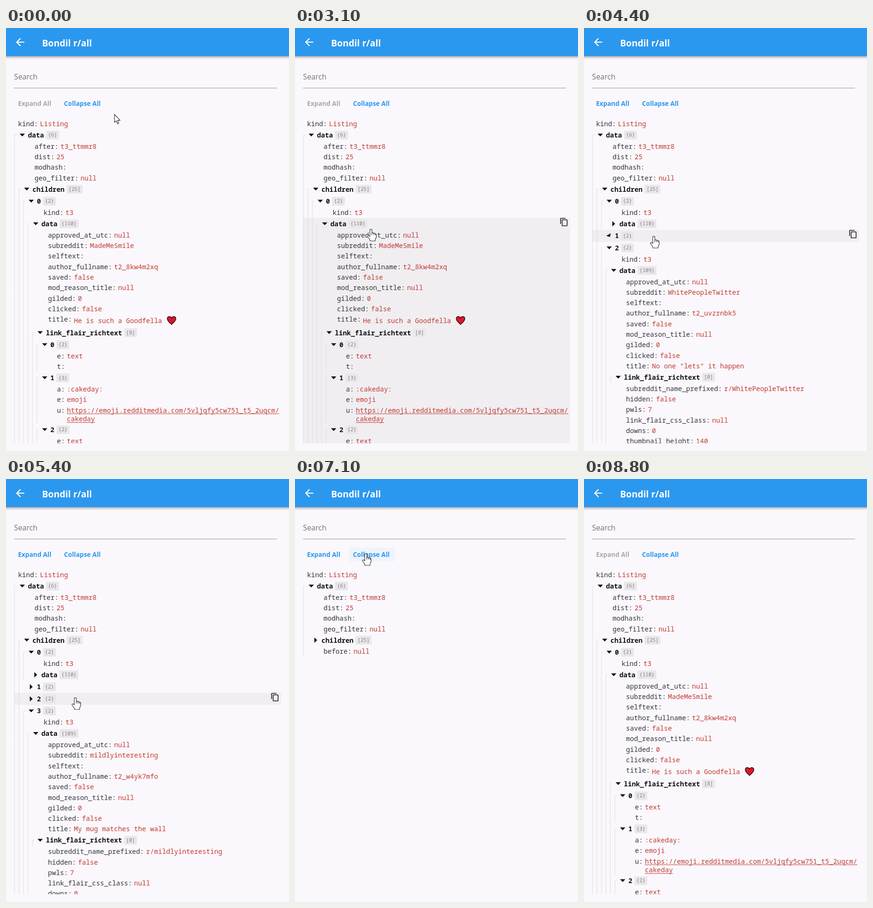
An HTML page with a canvas that plays this animation: 600x896 px, repeating every 9.5 s.

```html
<!DOCTYPE html>
<html lang="en">
<head>
<meta charset="utf-8">
<title>JSON explorer</title>
<style>
html, body { margin: 0; width: 100%; height: 100%; overflow: hidden; background: #faf8fc; }
canvas { display: block; }
</style>
</head>
<body>
<canvas id="stage" width="600" height="896"></canvas>
<script>
const ctx = document.getElementById('stage').getContext('2d');
const LOOP = 9500, STEP = 100, SPIN = 300;
const COLLAPSE_ALL = 7200, EXPAND_ALL = 8200;
const TOP = 192, BOTTOM = 879.5, LEAF_H = 22.3, NODE_H = 25.5;
const INDENT = 9.5, CHAR = 8.5;
const MONO = '"Noto Sans Mono", "DejaVu Sans Mono", monospace';
const SANS = '"Open Sans", "Noto Sans", sans-serif';
const BLUE = '#2b98ef', RED = '#c23a34';

const leaf = (key, value = '', extra = {}) => ({ key, value, h: LEAF_H, ...extra });
const node = (key, badge, kids, closeAt = Infinity) => ({ key, badge, kids, closeAt, h: NODE_H });

function post(index, sub, author, title, options = {}) {
  const { size = 109, closeAt, dataCloseAt, flair = [], heart = false } = options;
  const data = node('data', `{${size}}`, [
    leaf('approved_at_utc', 'null'),
    leaf('subreddit', sub),
    leaf('selftext'),
    leaf('author_fullname', author),
    leaf('saved', 'false'),
    leaf('mod_reason_title', 'null'),
    leaf('gilded', '0'),
    leaf('clicked', 'false'),
    leaf('title', title, heart ? { heart, h: 26.8 } : {}),
    node('link_flair_richtext', flair.length ? '[8]' : '[0]', flair),
    leaf('subreddit_name_prefixed', 'r/' + sub),
    leaf('hidden', 'false'),
    leaf('pwls', '7'),
    leaf('link_flair_css_class', 'null'),
    leaf('downs', '0'),
    leaf('thumbnail_height', '140'),
    leaf('top_awarded_type', 'null'),
    leaf('hide_score', 'false')
  ], dataCloseAt);
  return node(String(index), '{2}', [leaf('kind', 't3'), data], closeAt);
}

const flair = [
  node('0', '{2}', [leaf('e', 'text'), leaf('t')]),
  node('1', '{3}', [
    leaf('a', ':cakeday:'),
    leaf('e', 'emoji'),
    leaf('u', 'https://emoji.redditmedia.com/5vljqfy5cw751_t5_2uqcm/', { wrap: 'cakeday', h: 39.8 })
  ]),
  node('2', '{2}', [leaf('e', 'text'), leaf('t')])
];

const tree = [
  leaf('kind', 'Listing'),
  node('data', '{6}', [
    leaf('after', 't3_ttmmr8'),
    leaf('dist', '25'),
    leaf('modhash'),
    leaf('geo_filter', 'null'),
    node('children', '[25]', [
      post(0, 'MadeMeSmile', 't2_8kw4m2xq', 'He is such a Goodfella',
        { size: 110, dataCloseAt: 3400, flair, heart: true }),
      post(1, 'gardening', 't2_v6nq3zth', 'First tomatoes of the year', { closeAt: 4300 }),
      post(2, 'WhitePeopleTwitter', 't2_uvzrnbk5', 'No one "lets" it happen', { closeAt: 5100 }),
      post(3, 'mildlyinteresting', 't2_w4yk7mfo', 'My mug matches the wall'),
      post(4, 'pics', 't2_z9bt2lqa', 'Morning by the lake')
    ], 6400),
    leaf('before', 'null')
  ])
];

// Time and tip position of the pointer
const path = [
  [500, 230, 183], [600, 228, 186], [900, 228, 186], [1700, 204, 231],
  [2000, 204, 231], [3000, 162, 424], [3100, 161, 426], [3400, 161, 426],
  [4100, 148, 441], [4400, 148, 441], [4800, 147, 463], [5500, 147, 463],
  [6100, 135, 349], [6400, 135, 349], [7000, 150, 158], [7300, 150, 158],
  [7700, 78, 158], [8300, 78, 158], [8800, -40, 150]
];

const clamp = v => Math.max(0, Math.min(1, v));

function pointerAt(t) {
  const i = path.findIndex(p => p[0] >= t);
  if (i <= 0) return path[i < 0 ? path.length - 1 : 0].slice(1);
  const [t0, x0, y0] = path[i - 1], [t1, x1, y1] = path[i];
  const u = (t - t0) / (t1 - t0), e = u * u * (3 - 2 * u);
  return [x0 + (x1 - x0) * e, y0 + (y1 - y0) * e];
}

function openness(item, t) {
  if (t >= EXPAND_ALL) return clamp((t - EXPAND_ALL) / SPIN);
  return 1 - clamp((t - Math.min(item.closeAt, COLLAPSE_ALL)) / SPIN);
}

const isOpen = (item, t) => t >= EXPAND_ALL || t < Math.min(item.closeAt, COLLAPSE_ALL);

function layout(t) {
  const rows = [];
  let y = TOP;
  const visit = (items, depth) => {
    for (const item of items) {
      const row = { item, depth, y, cy: y + (item.kids ? NODE_H : LEAF_H) / 2 };
      rows.push(row);
      y += item.h;
      if (item.kids && isOpen(item, t)) visit(item.kids, depth + 1);
      row.end = y;
    }
  };
  visit(tree, 0);
  return rows;
}

function text(str, x, y, font, color) {
  ctx.font = font;
  ctx.fillStyle = color;
  ctx.fillText(str, x, y);
}

function roundRect(x, y, w, h, r, color) {
  ctx.fillStyle = color;
  ctx.beginPath();
  ctx.roundRect(x, y, w, h, r);
  ctx.fill();
}

function icon(d, x, y, scale, cx, cy, color) {
  ctx.save();
  ctx.translate(x, y);
  ctx.scale(scale, scale);
  ctx.translate(-cx, -cy);
  ctx.fillStyle = color;
  ctx.fill(new Path2D(d));
  ctx.restore();
}

function drawHeart(x, y) {
  const heart = new Path2D('M0 8.5C-4 5-9 1-9-3.5C-9-9-2.5-10 0-5C2.5-10 9-9 9-3.5C9 1 4 5 0 8.5Z');
  ctx.save();
  ctx.translate(x, y);
  ctx.fillStyle = '#e3142b';
  ctx.fill(heart);
  ctx.strokeStyle = '#2c1015';
  ctx.lineWidth = 1.6;
  ctx.stroke(heart);
  ctx.restore();
}

function drawNode({ item, depth, cy, end }, t) {
  const shift = depth * INDENT, x = 46.5 + shift;
  if (isOpen(item, t)) {
    const lineX = 18 + shift;
    ctx.strokeStyle = '#dedce1';
    ctx.lineWidth = 1;
    ctx.beginPath();
    ctx.moveTo(lineX + 4, cy - 0.5);
    ctx.lineTo(lineX, cy - 0.5);
    ctx.lineTo(lineX, end - 1);
    ctx.stroke();
  }
  ctx.save();
  ctx.translate(34.5 + shift, cy - 0.4);
  ctx.rotate(openness(item, t) * Math.PI / 2);
  ctx.fillStyle = '#111';
  ctx.beginPath();
  ctx.moveTo(-3, -5.6);
  ctx.lineTo(3, 0);
  ctx.lineTo(-3, 5.6);
  ctx.fill();
  ctx.restore();

  text(item.key, x, cy + 4.8, `bold 14.17px ${MONO}`, '#111113');
  const badgeX = x + item.key.length * CHAR + 4.5;
  roundRect(badgeX, cy - 9.5, item.badge.length * 6.4 + 8, 18.5, 2, '#e9e7ea');
  text(item.badge, badgeX + 4, cy + 3.2, `10.67px ${MONO}`, '#828184');
}

function drawLeaf({ item, depth, y, cy }) {
  const font = `14.17px ${MONO}`;
  const x = depth ? 51 + depth * INDENT : 25.5;
  const valueX = x + (item.key.length + 1) * CHAR + 4;
  const keyY = item.heart ? y + 16 : cy + 4.8;
  const valueY = item.heart ? y + 19 : keyY;
  text(item.key + ':', x, keyY, font, '#353438');
  text(item.value, valueX, valueY, font, RED);
  if (item.heart) drawHeart(valueX + item.value.length * CHAR + 20, y + 13.3);
  if (item.wrap) {
    text(item.wrap, valueX, valueY + 18.5, font, RED);
    ctx.fillRect(valueX, valueY + 2, item.value.length * CHAR, 1);
    ctx.fillRect(valueX, valueY + 20.5, item.wrap.length * CHAR, 1);
  }
}

function drawTree(t, px, py) {
  const rows = layout(t);
  const hovered = rows.find(r => px > 17 && px < 582 && py >= r.y && py < r.y + r.item.h);
  ctx.save();
  ctx.beginPath();
  ctx.rect(0, TOP - 8, 600, BOTTOM - TOP + 8);
  ctx.clip();
  if (hovered) {
    ctx.fillStyle = '#f0eef1';
    ctx.fillRect(17, hovered.y - 0.5, 566, hovered.end - hovered.y);
  }
  for (const row of rows) {
    if (row.y > BOTTOM) continue;
    if (row.item.kids) drawNode(row, t);
    else drawLeaf(row);
  }
  if (hovered) {
    icon('M16 1H4c-1.1 0-2 .9-2 2v14h2V3h12V1zm3 4H8c-1.1 0-2 .9-2 2v14c0 1.1.9 2 2 2h11c1.1 0 2-.9 2-2V7c0-1.1-.9-2-2-2zm0 16H8V7h11v14z',
      570, hovered.cy - 4, 0.8, 11.5, 12, '#1d1d1f');
  }
  ctx.restore();
  return Boolean(hovered);
}

function drawButton(label, x, w, enabled, px, py) {
  const hover = enabled && px >= x && px <= x + w && py >= 145 && py <= 175;
  if (hover) roundRect(x, 145, w, 30, 4, '#eef4fb');
  text(label, x + 8.5, 165, `bold 13.5px ${SANS}`, enabled ? BLUE : '#a9a8ac');
  return hover;
}

function drawHeader() {
  ctx.save();
  ctx.shadowColor = 'rgba(0,0,0,.35)';
  ctx.shadowBlur = 5;
  ctx.shadowOffsetY = 2;
  ctx.fillStyle = BLUE;
  ctx.fillRect(-10, -10, 620, 69.5);
  ctx.restore();
  icon('M20 11H7.83l5.59-5.59L12 4l-8 8 8 8 1.41-1.41L7.83 13H20v-2z', 30, 30, 1.1, 12, 12, '#fff');
  text('Bondil r/all', 76.5, 39, `bold 19.1px ${SANS}`, '#fff');
  text('Search', 17, 109, `15.8px ${SANS}`, '#737276');
  ctx.fillStyle = '#b5b3b8';
  ctx.fillRect(17, 126.5, 557.5, 1.5);
}

const ARROW = new Path2D('M0 0V17L3.9 13.6L6.6 20L9.2 18.9L6.5 12.6H12Z');
const HAND = new Path2D('M-2.2 2C-2.2-.6 2.2-.6 2.2 2V8C4 7.4 5.4 7.8 6 8.6C7.5 8.4 9 8.8 9.3 10C10.6 9.8 11.4 10.8 11.4 12V17L9 22V25H-2V22.5L-7 15.5C-7.4 13-4.6 12.4-2.2 15.5Z');
const KNUCKLES = new Path2D('M2.2 8V12.5M5.8 8.8V12.5M9.2 10V13');

function drawPointer(x, y, hand) {
  const shape = hand ? HAND : ARROW;
  ctx.save();
  ctx.translate(x, y);
  ctx.lineJoin = 'round';
  ctx.fillStyle = '#fff';
  ctx.fill(shape);
  ctx.strokeStyle = '#343438';
  ctx.lineWidth = 1.2;
  ctx.stroke(shape);
  if (hand) ctx.stroke(KNUCKLES);
  ctx.restore();
}

function draw(t) {
  const [px, py] = pointerAt(t);
  const allOpen = t < 3400 || t >= EXPAND_ALL;
  const allClosed = t >= COLLAPSE_ALL && t < EXPAND_ALL;
  ctx.fillStyle = '#faf8fc';
  ctx.fillRect(0, 0, 600, 896);
  drawHeader();
  const overExpand = drawButton('Expand All', 17, 88.5, !allOpen, px, py);
  const overCollapse = drawButton('Collapse All', 114.5, 97, !allClosed, px, py);
  const overTree = drawTree(t, px, py);
  drawPointer(px, py, overExpand || overCollapse || overTree);
}

function tick() {
  const t = performance.now() % LOOP;
  draw(Math.floor(t / STEP) * STEP);
  requestAnimationFrame(tick);
}
tick();
</script>
</body>
</html>
```
